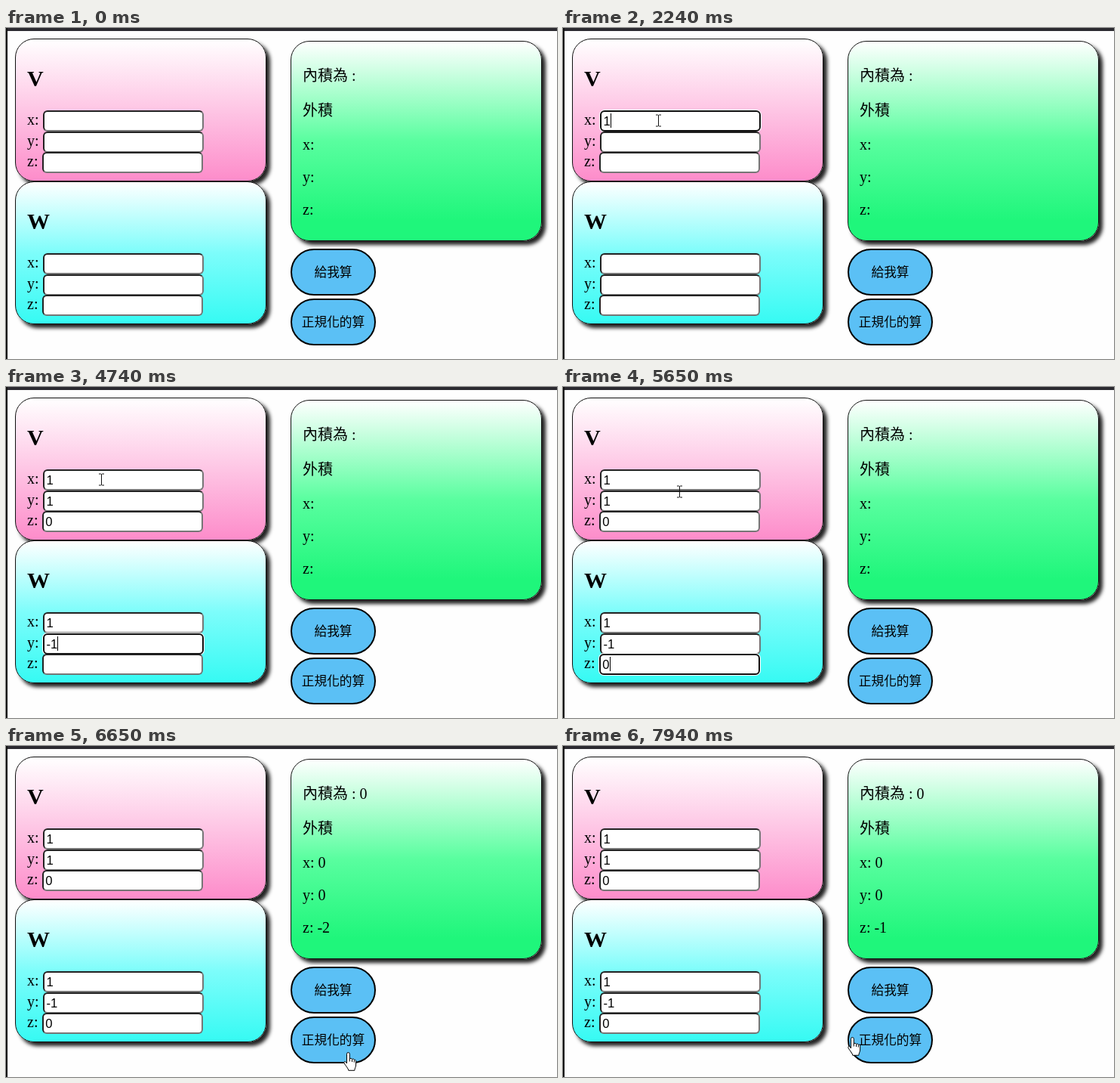
Recreate the animation shown at these times as an HTML page. Size 730x438 px, loop 7.99 s.

```html
<!DOCTYPE html>
<html lang="zh-Hant">
<head>
<meta charset="utf-8">
<title>內積與外積</title>
<style>
  html, body { margin: 0; width: 100%; height: 100%; overflow: hidden; background: #fefefe; }
  #stage { position: absolute; left: 0; top: 0; width: 730px; height: 438px; overflow: hidden; }
  #stage > * { position: absolute; box-sizing: border-box; }
  .top { left: 0; top: 0; width: 730px; height: 4px; background: #2b2a30; }
  .side { left: 0; top: 0; width: 2px; height: 438px; background: #111; }
  .card { width: 333px; border: 1px solid #111; border-radius: 25px; box-shadow: 5px 5px 5px #222; }
  .v { left: 12px; top: 14px; height: 189px; background: linear-gradient(#fff, #fd8cca); }
  .w { left: 12px; top: 203px; height: 189px; background: linear-gradient(#fff, #7dfdfb 50%, #36faf3); }
  .result { left: 377px; top: 17px; height: 265px; background: linear-gradient(#fff, #59fe9f 50%, #1ff67b 90%); }
  .button { left: 377px; width: 113px; height: 62px; border: 2px solid #000; border-radius: 31px; background: #5bc0f5; }
  .field { width: 213px; height: 28px; border: 2px solid; border-color: #222 #767676 #767676 #222; border-radius: 6px; background: #fff; }
  .field.focus { border-color: #101010; box-shadow: 0 0 0 1px #fff; }
  svg { left: 0; top: 0; width: 730px; height: 438px; }
  text { white-space: pre; }
  .serif { font: 300 20px "Liberation Serif", "Noto Sans CJK TC", "Noto Sans CJK JP", serif; }
  .head { font: bold 30px "Liberation Serif", serif; }
  .value { font: 16.67px "Liberation Sans", sans-serif; }
  .label { font: 300 16.67px "Noto Sans CJK TC", "Noto Sans CJK JP", sans-serif; text-anchor: middle; }
</style>
</head>
<body>
<div id="stage">
  <div class="top"></div>
  <div class="side"></div>
  <div class="card v"></div>
  <div class="card w"></div>
  <div class="card result"></div>
  <div class="button" style="top:292px"></div>
  <div class="button" style="top:358px"></div>
  <svg id="ink">
    <text class="head" x="28" y="77">V</text>
    <text class="head" x="28" y="266">W</text>
    <text class="serif" x="393" y="116">外積</text>
    <text class="label" x="433.5" y="329">給我算</text>
    <text class="label" x="433.5" y="395">正規化的算</text>
    <rect id="caret" width="1" height="19"/>
    <g id="cursor">
      <path id="arrow" d="M.5 .5V16.5L4.2 13L6.8 18.7L9.2 17.7L6.7 12.1H11.8Z" fill="#fff" stroke="#000"/>
      <path id="beam" d="M-3.5 -7.5H-1L0 -7L1 -7.5H3.5M0 -7V7M-3.5 7.5H-1L0 7L1 7.5H3.5" transform="translate(.5 .5)" fill="none" stroke="#111"/>
      <g id="hand" transform="translate(-6 0)" stroke="#000" stroke-linejoin="round">
        <path fill="#fff" d="M4.5 15V2.5a1.9 1.9 0 0 1 3.8 0V9.2c.2-1.2 3-1.2 3.2.4c.6-1 2.7-.6 2.8.9c.7-.7 2.3-.2 2.3 1.2V17c0 3-1.6 4-1.8 7.3H6.8C6.6 21.5 3 18.5 1 14.6c-.8-1.6 1-2.8 2.2-1.5z"/>
        <path d="M8.3 9v3.5M11.5 10v3M14.3 11v2.6"/>
      </g>
    </g>
  </svg>
</div>
<script>
const LOOP = 7990;
const $ = id => document.getElementById(id);
const stage = $('stage'), ink = $('ink'), caret = $('caret');

function addText(cls, x, y, content = '') {
  const el = document.createElementNS('http://www.w3.org/2000/svg', 'text');
  el.setAttribute('class', cls);
  el.setAttribute('x', x);
  el.setAttribute('y', y);
  el.textContent = content;
  ink.insertBefore(el, caret);
  return el;
}

// on: focus time, off: blur time, keys: [time, character]
const fields = [
  { on: 1590, off: 2390, keys: [[2240, '1']] },
  { on: 2390, off: 2790, keys: [[2690, '1']] },
  { on: 2790, off: 3190, keys: [[3040, '0']] },
  { on: 3190, off: 4390, keys: [[4240, '1']] },
  { on: 4390, off: 4890, keys: [[4590, '-'], [4740, '1']] },
  { on: 4890, off: 6180, keys: [[5300, '0']] }
];
fields.forEach((f, i) => {
  const row = i % 3, base = i < 3 ? 0 : 189;
  f.x = row === 2 ? 47.5 : 48.6;
  f.y = base + [109, 136.5, 164][row];
  f.box = document.createElement('div');
  f.box.className = 'field';
  f.box.style.cssText = `left:${f.x}px;top:${f.y}px`;
  stage.insertBefore(f.box, ink);
  addText('serif', 28, base + [128, 156, 183][row], 'xyz'[row] + ':');
  f.text = addText('value', f.x + 4.8, Math.round(f.y) + 19.5);
});

const results = [
  ['內積為 :', 70], ['x:', 160.5], ['y:', 203.5], ['z:', 246.5]
].map(([name, y]) => ({ name, el: addText('serif', 393, y) }));

// Pointer paths: the tip eases through [time, x, y]; it is away between paths.
const paths = [
  { until: 410, points: [[100, 632, 414], [400, 160, 3]] },
  { until: 7600, points: [
    [970, 145, 16], [1130, 133, 106], [1300, 133, 106], [1400, 126, 122],
    [5560, 126, 122], [6080, 476, 313], [6400, 476, 313], [6650, 453, 405],
    [6760, 453, 405], [6900, 451, 390], [7380, 451, 390], [7600, 309, 432]] },
  { until: LOOP, points: [[7830, 312, 428], [7940, 383, 385]] }
];

function pointerAt(t) {
  const path = paths.find(p => t >= p.points[0][0] && t < p.until);
  if (!path) return null;
  const pts = path.points;
  const next = pts.findIndex(p => p[0] > t);
  if (next < 0) return pts[pts.length - 1].slice(1);
  const [t0, x0, y0] = pts[next - 1], [t1, x1, y1] = pts[next];
  const u = (t - t0) / (t1 - t0), e = u * u * (3 - 2 * u);
  return [x0 + (x1 - x0) * e, y0 + (y1 - y0) * e];
}

const inside = (x, y, left, top, w, h) => x >= left && x < left + w && y >= top && y < top + h;

function pointerKind(x, y) {
  if ([292, 358].some(top => inside(x, y, 377, top, 113, 62))) return 'hand';
  if (fields.some(f => inside(x, y, f.x, f.y, 213, 28))) return 'beam';
  return 'arrow';
}

function drawFields(t) {
  caret.style.display = 'none';
  for (const f of fields) {
    const typed = f.keys.filter(k => t >= k[0]);
    const focused = t >= f.on && t < f.off;
    f.text.textContent = typed.map(k => k[1]).join('');
    f.box.classList.toggle('focus', focused);
    if (!focused) continue;
    const since = typed.length ? typed[typed.length - 1][0] : f.on;
    if (Math.floor((t - since) / 500) % 2) continue;
    const width = typed.reduce((sum, k) => sum + (k[1] === '-' ? 5.55 : 9.27), 0);
    caret.setAttribute('x', Math.round(f.x + 5 + width));
    caret.setAttribute('y', Math.round(f.y) + 4);
    caret.style.display = '';
  }
}

function drawResults(t) {
  const values = t < 6240 ? [] : [0, 0, 0, t < 7210 ? -2 : -1];
  results.forEach((r, i) => {
    r.el.textContent = values.length ? `${r.name} ${values[i]}` : r.name;
  });
}

function drawPointer(t) {
  const at = pointerAt(t);
  $('cursor').style.display = at ? '' : 'none';
  if (!at) return;
  const [x, y] = at.map(Math.round), kind = pointerKind(x, y);
  $('cursor').setAttribute('transform', `translate(${x} ${y})`);
  for (const id of ['arrow', 'beam', 'hand']) $(id).style.display = id === kind ? '' : 'none';
}

const start = performance.now();
function draw() {
  const t = (performance.now() - start) % LOOP;
  drawFields(t);
  drawResults(t);
  drawPointer(t);
  requestAnimationFrame(draw);
}
draw();
</script>
</body>
</html>
```
